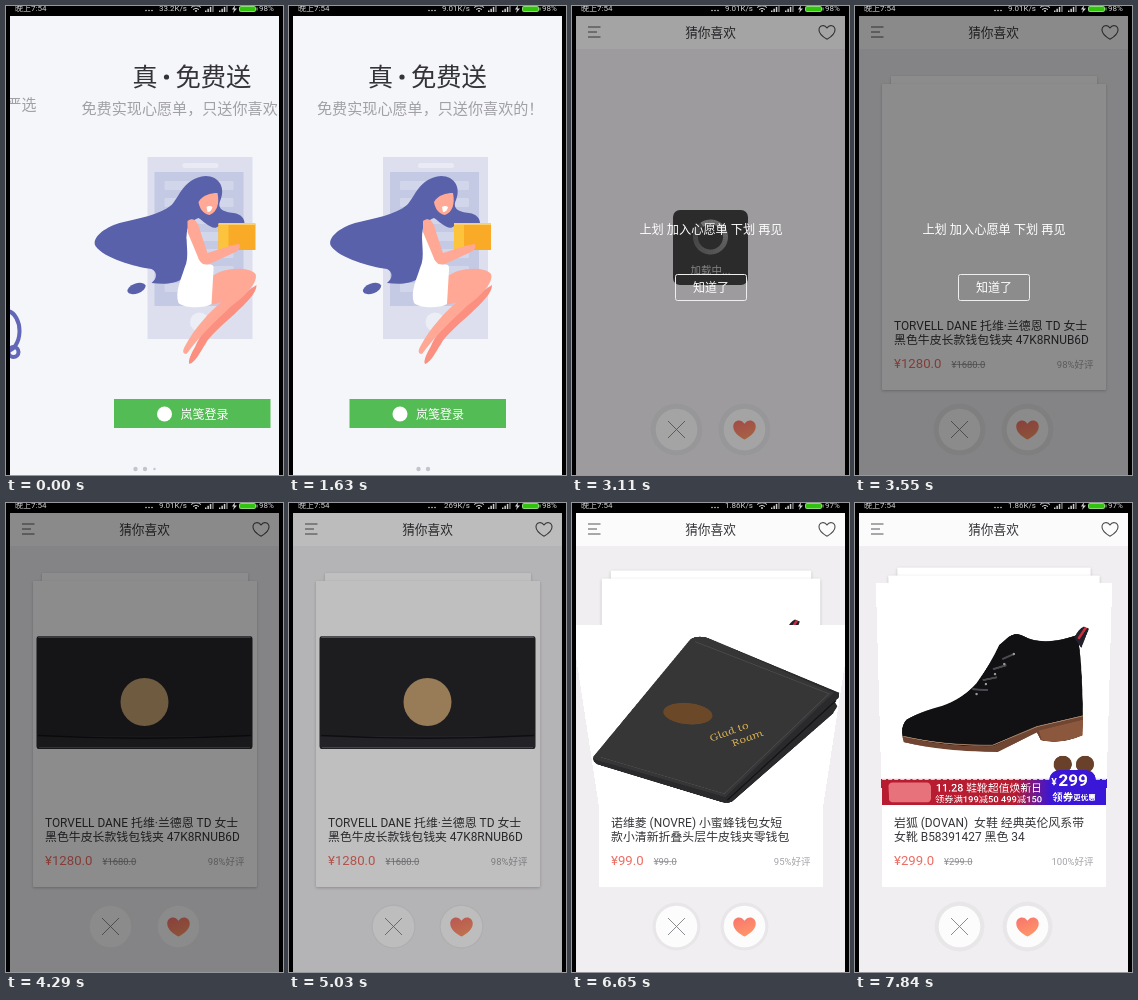
Animation, 277 px wide and 469 px high, one loop 7.99 s. Source, as an HTML page with a canvas:

```html
<!DOCTYPE html>
<html lang="zh-CN">
<head>
<meta charset="utf-8">
<style>
html, body { margin: 0; width: 100%; height: 100%; overflow: hidden; background: #000; }
canvas { display: block; width: 277px; height: 469px; }
</style>
</head>
<body>
<canvas id="stage"></canvas>
<script>
const W = 277, H = 469, LOOP = 7990, STEPS = 54;
const FONT = 'Roboto, "Noto Sans CJK SC", "Noto Sans CJK", sans-serif';
const HINGE = 303, TOP = 78, MID = 139, HALF = 112;
const canvas = document.getElementById('stage');
const dpr = Math.max(1, window.devicePixelRatio || 1);
canvas.width = W * dpr;
canvas.height = H * dpr;
const screen2d = canvas.getContext('2d');
const flap = document.createElement('canvas');
flap.width = HALF * 4;
flap.height = (HINGE - TOP) * 2;
const flap2d = flap.getContext('2d');
let g = screen2d;

// Linear interpolation through [step, value] keys
function at(k, keys) {
  if (k <= keys[0][0]) return keys[0][1];
  for (let i = 1; i < keys.length; i++) {
    const [k0, v0] = keys[i - 1], [k1, v1] = keys[i];
    if (k <= k1) return v0 + (v1 - v0) * (k - k0) / (k1 - k0);
  }
  return keys[keys.length - 1][1];
}
function rect(x, y, w, h, color, r = 0) {
  g.fillStyle = color;
  g.beginPath();
  g.roundRect(x, y, w, h, r);
  g.fill();
}
function disc(x, y, r, color) {
  g.fillStyle = color;
  g.beginPath();
  g.arc(x, y, r, 0, 7);
  g.fill();
}
function oval(x, y, rx, ry, turn, color) {
  g.fillStyle = color;
  g.beginPath();
  g.ellipse(x, y, rx, ry, turn, 0, 7);
  g.fill();
}
function shape(d, color) {
  g.fillStyle = color;
  g.fill(new Path2D(d));
}
function line(d, color, width = 1) {
  g.strokeStyle = color;
  g.lineWidth = width;
  g.stroke(new Path2D(d));
}
function text(s, x, y, size, color, align = 'left', weight = 400) {
  g.font = `${weight} ${size}px ${FONT}`;
  g.textAlign = align;
  g.fillStyle = color;
  g.fillText(s, x, y);
  return g.measureText(s).width;
}
function gradient(x0, y0, x1, y1, from, to) {
  const fill = g.createLinearGradient(x0, y0, x1, y1);
  fill.addColorStop(0, from);
  fill.addColorStop(1, to);
  return fill;
}
function moved(x, draw) {
  g.save();
  g.translate(x, 0);
  draw();
  g.restore();
}

function statusBar(k) {
  const ink = '#cfcfcf';
  rect(0, 0, W, 10, '#000');
  text('晚上7:54', 9, 5.4, 8, ink);
  for (let i = 0; i < 3; i++) disc(140 + i * 3, 4.5, 0.8, ink);
  const speed = k < 11 ? '33.2K/s' : k < 32 ? '9.01K/s' : k < 43 ? '269K/s' : '1.86K/s';
  text(speed, 181, 5.4, 8, ink, 'right');
  line('M185 1.5 Q190 -2 195 1.5 M187 3.5 Q190 1 193 3.5', ink);
  disc(190, 5, 1, ink);
  for (const x of [199, 213])
    for (let i = 0; i < 4; i++) rect(x + i * 2.4, 4.5 - i * 1.8, 1.5, 1.5 + i * 1.8, i < 3 ? ink : '#777');
  shape('M229 -1 L226 3.5 H228 L227 7 L231 2.5 H228.6Z', ink);
  rect(233, 0, 17, 6, '#8bd878', 2);
  rect(234, 1, 15, 4, '#32c40d', 1);
  rect(250.5, 1.5, 1, 3, '#8bd878');
  text(k < 43 ? '98%' : '97%', 253, 5.4, 8, ink);
}

function phone() {
  rect(94, 151, 105, 182, '#dddfee');
  rect(129, 157, 36, 5, '#e9eaf4', 2.5);
  rect(101, 166, 89, 134, '#c4c9e4');
  for (let i = 0; i < 7; i++) rect(111, 175 + i * 17, 69, 9, '#d2d6ea', 1);
  disc(146, 316, 9.5, '#eceef6');
}
function woman() {
  shape('M152 170C166 170 172 182 167 194C163 203 170 206 180 207C188 208 191 213 191 217L165 220C160 226 150 215 145 212C138 214 134 222 133 232C137 245 139 262 130 272C121 279 108 278 98 277C104 272 104 266 98 263C82 261 50 252 42 240C38 232 50 222 66 217C86 212 106 209 118 199C126 191 130 172 152 170Z', '#5a61ab');
  oval(83, 282.5, 9.5, 5, -0.35, '#5a61ab');
  shape('M145 196C149 189 157 187 164 187C166 197 164 206 156 209C150 208 146 203 145 196Z', '#ffa996');
  shape('M153 201Q156 199 159 201Q158 206 154 206Z', '#fff');
  shape('M203 279C204 294 160 322 152 338C146 347 142 356 136 358C134 355 138 347 142 340C150 322 170 300 203 279Z', '#fb9080');
  shape('M158 271C168 261 196 260 202 268C205 276 192 290 178 300C162 315 146 330 133 348C129 348 129 345 131 341C141 322 156 306 168 296C163 298 159 299 157 298Z', '#ffa896');
  shape('M134 222C139 235 144 250 150 257C156 260 161 256 160 264L158 298C150 303 130 302 125 297C121 286 128 272 131 262C137 250 131 236 134 222Z', '#fff');
  rect(165, 218, 37, 26, '#f9ab28');
  rect(165, 218, 10, 26, '#fcc33c');
  rect(165, 217, 37, 2, '#fbd06a');
  shape('M134 215C141 210 145 217 147 226L154 247L176 240L185 238C188 240 186 244 182 246L156 258C149 260 146 256 144 250L134 226Z', '#ffa896');
}
function welcome(k) {
  rect(4, 10, 269, 459, '#f5f6fa');
  moved(k < 4 ? 47.5 * Math.pow(0.36, k) : 0, () => {
    text('严选', -17, 103.5, 15, '#a0a0a6', 'right');
    g.strokeStyle = '#6367b8';
    g.lineWidth = 4;
    g.beginPath();
    g.ellipse(-47, 325, 13, 20, 0, -1.5, 1.5);
    g.stroke();
    g.beginPath();
    g.arc(-40, 346, 5, 0, 7);
    g.stroke();
    text('真', 79, 79.5, 25, '#333338');
    disc(113, 71, 2.6, '#333338');
    text('免费送', 122, 79.5, 25.3, '#333338');
    text('免费实现心愿单，只送你喜欢的！', 28, 107.7, 15.1, '#a0a0a6');
    phone();
    woman();
    rect(60.5, 393, 156.5, 29, '#54bc54');
    disc(111, 408, 7.5, '#fff');
    text('岚笺登录', 127, 412.5, 12, '#fff');
  });
  disc(129.5, 463, 2.2, '#c4c5cc');
  disc(139, 463, 2.2, '#c4c5cc');
  if (k < 1) disc(148.5, 463, 1.2, '#c4c5cc');
}

function purse() {
  rect(30.5, 133, 216, 113, '#27262b', 3);
  rect(32, 133, 213, 2, '#6a696e', 1);
  rect(31, 233, 215, 13, '#2e2d33', 2);
  line('M32 232.5Q138 238 245 232.5', '#131216', 1.5);
  line('M33 244.5H244', '#5a595f', 1);
  disc(138.5, 199, 24, '#c9a574');
}
function wallet() {
  shape('M122 93Q127 88 136 91L250 151V157L247 161L250 167L247 176L160 296Q156 299 150 297L32 242Q27 238 29 231Z', '#2a2a2c');
  shape('M122 93Q127 88 136 91L245 151L153 289L32 236Q28 234 29 231Z', '#363637');
  line('M126 95L241 152L152 284L36 232', '#4b4b4d', 0.8);
  line('M248 160L155 294', '#141415', 1.5);
  oval(118.5, 176, 22, 13, 0.15, '#6a4828');
  g.save();
  g.translate(157, 202);
  g.rotate(-0.48);
  g.font = 'italic 11.5px "Noto Serif", serif';
  g.fillStyle = '#c9a550';
  g.textAlign = 'center';
  g.fillText('Glad to', 0, 0);
  g.fillText('Roam', 11, 15);
  g.restore();
}
function boot() {
  shape('M153 130Q160 125 167 129Q186 140 219 128Q224 150 226 211L181 226L140 244Q85 246 50 234Q46 222 53 213Q66 205 88 199Q108 192 122 176Q136 156 144 138Z', '#111113');
  shape('M216 131Q220 122 225 120L230 122L223 141Z', '#20212b');
  line('M220 132L227 121', '#c8303c', 2.5);
  shape('M49 230Q90 241 138 240L181 220L226 209L226 229Q204 239 185 234L181 226L143 246Q90 246 50 236Z', '#704532');
  shape('M183 224L226 213L226 229Q205 238 186 234Z', '#8b573d');
  line('M50 230Q92 240 138 239L181 220L226 209', '#a58066', 1);
  line('M147 152L158 147M138 162L151 158M128 173L142 170M118 182L133 183', '#4a4a50', 2);
  for (let i = 0; i < 5; i++) disc(158 - i * 9, 147 + i * 10, 1.2, '#999');
}
function banner() {
  rect(27, 274, 224, 28, gradient(160, 0, 196, 0, '#b71c31', '#3a16d8'));
  disc(207, 259, 9, '#694029');
  disc(229, 259, 9, '#694029');
  rect(194, 265, 46, 24, '#3a16d8', 10);
  g.setLineDash([4, 2]);
  line('M28 275H194M240 275H250', '#fff', 0.8);
  g.setLineDash([]);
  rect(34, 278, 42, 21, '#e8727c', 4);
  text('11.28 鞋靴超值焕新日', 81, 287.5, 10.8, '#fff', 'left', 500);
  text('领券满199减50 499减150', 80, 299, 9.3, '#fff', 'left', 500);
  text('¥', 196, 281, 10, '#fff', 'left', 700);
  text('299', 203, 281.5, 17, '#fff', 'left', 700);
  text('领券', 197, 297, 10.5, '#fff', 'left', 700);
  text('更优惠', 218, 296.5, 7.5, '#fff', 'left', 700);
}

const cards = [
  { pic: purse, lines: ['TORVELL DANE 托维·兰德恩 TD 女士', '黑色牛皮长款钱包钱夹 47K8RNUB6D'], price: '¥1280.0', old: '¥1680.0', rate: '98%好评' },
  { pic: wallet, lines: ['诺维菱 (NOVRE) 小蜜蜂钱包女短', '款小清新折叠头层牛皮钱夹零钱包'], price: '¥99.0', old: '¥99.0', rate: '95%好评' },
  { pic() { boot(); banner(); }, lines: ['岩狐 (DOVAN)  女鞋 经典英伦风系带', '女靴 B58391427 黑色 34'], price: '¥299.0', old: '¥299.0', rate: '100%好评' }
];

function details(c) {
  c.lines.forEach((s, i) => text(s, 39, 324 + i * 14, 11.9, '#37373b'));
  const x = 49 + text(c.price, 39, 362, 13.2, '#ee6c62');
  const w = text(c.old, x, 362, 9.4, '#8d8d92');
  rect(x, 358.3, w, 0.8, '#8d8d92');
  text(c.rate, 238.5, 362, 9.5, '#a3a3a8', 'right');
}
function paper(y, h) {
  g.save();
  g.shadowColor = 'rgba(0,0,0,.22)';
  g.shadowBlur = 3 * dpr;
  g.shadowOffsetY = dpr;
  rect(27, y, 224, h, '#fff', 1);
  g.restore();
}
function flatCard(c, loaded = true) {
  paper(TOP, 306);
  if (!c) return;
  if (loaded) c.pic();
  details(c);
}
// The picture half swings towards the viewer around the hinge
function foldedCard(c, a) {
  g.save();
  g.globalAlpha = Math.max(0, Math.min(1, 1 - (a - 1.25) / 0.35));
  rect(27, HINGE - 1, 224, 82, '#fff', 1);
  details(c);
  g.restore();
  const top = TOP + 330 * (1 - Math.cos(a)), tall = HINGE - top;
  if (tall < 2) return;
  const grow = Math.sin(a) / 2;
  g = flap2d;
  g.setTransform(2, 0, 0, 2, -27 * 2, -TOP * 2);
  rect(27, TOP, 224, HINGE - TOP, '#fff');
  c.pic();
  g = screen2d;
  const source = y => {
    const u = (HINGE - y) / tall;
    return flap.height * (1 - u * (1 + grow) / (1 + u * grow));
  };
  for (let y = top; y < HINGE; y++) {
    const end = Math.min(HINGE, y + 1), s0 = Math.max(0, source(y));
    const half = HALF * (1 + grow * (HINGE - y) / tall);
    g.drawImage(flap, 0, s0, flap.width, Math.max(0.5, source(end) - s0), MID - half, y, half * 2, end - y + 0.3);
  }
}
function deck(k) {
  if (k < 23) return;
  const front = k < 42 ? 0 : k < 48 ? 1 : 2;
  const a = [
    at(k, [[37, 0], [38, 0.11], [39, 0.3], [40, 0.6], [41, 1.3]]),
    at(k, [[42, 0], [43, 0.1], [44, 0.26], [45, 0.52], [46, 0.95], [47, 1.45]]),
    at(k, [[51, 0], [52, 0.05], [53, 0.11]])
  ][front];
  const lift = Math.min(1, Math.pow(a, 0.55));
  for (let i = lift > 0 ? 2 : 1; i > 0; i--) {
    const depth = i - lift, size = (224 - 18 * depth) / 224;
    g.save();
    g.translate(27 + 9 * depth, TOP - 8 * depth);
    g.scale(size, size);
    g.translate(-27, -TOP);
    flatCard(i === 1 ? cards[front + 1] : null);
    g.restore();
  }
  if (a > 0) foldedCard(cards[front], a);
  else flatCard(cards[front], k >= 27);
}

function heart(x, y, w) {
  const p = new Path2D(), s = w / 2;
  p.moveTo(x, y + s * 0.85);
  for (const side of [-s, s]) {
    p.moveTo(x, y + s * 0.85);
    p.bezierCurveTo(x + side * 0.35, y + s * 0.65, x + side, y + s * 0.25, x + side, y - s * 0.3);
    p.bezierCurveTo(x + side, y - s * 0.9, x + side * 0.3, y - s * 1.05, x, y - s * 0.55);
  }
  return p;
}
function buttons(k) {
  const halo = at(k, [[24, 26], [27, 20], [29, 20], [34, 22], [45, 24], [53, 25]]);
  for (const x of [104.5, 172.5]) {
    disc(x, 423.5, halo, 'rgba(0,0,0,.035)');
    disc(x, 423.5, 20.8, '#fcfcfc');
  }
  line('M96 415L113 432M113 415L96 432', '#808085', 0.9);
  g.fillStyle = gradient(168, 412, 176, 434, '#f8746e', '#ff9868');
  g.fill(heart(172.5, 424, 22.5));
}
function loading(k) {
  g.save();
  g.globalAlpha = at(k, [[14, 0], [15, 0.5], [17, 1]]);
  rect(101, 204, 75, 75, 'rgba(0,0,0,.72)', 7);
  g.lineWidth = 5;
  for (let i = 0; i < 40; i++) {
    const from = i * Math.PI / 20 - 2.6 + k * 0.02;
    g.strokeStyle = `rgba(255,255,255,${0.15 + 0.45 * (1 - i / 40)})`;
    g.beginPath();
    g.arc(138.5, 231, 15, from, from + Math.PI / 20);
    g.stroke();
  }
  text('加载中...', 138.5, 267.5, 10.5, '#c9c9c9', 'center');
  g.restore();
}
function home(k) {
  rect(4, 10, 269, 459, '#f0eef1');
  deck(k);
  rect(4, 10, 269, 33, '#fbfbfc');
  line('M16 21H28.5M16 26H25M16 31H28.5', '#55555a');
  text('猜你喜欢', 138.5, 31.2, 12.7, '#37373b', 'center');
  g.strokeStyle = '#4c4c50';
  g.lineWidth = 1.1;
  g.stroke(heart(255, 26.5, 16));
  buttons(k);
  if (k >= 15 && k < 23) loading(k);
}
function guide(k) {
  if (k < 21) return;
  const dim = at(k, [[21, 0.35], [24, 0.45], [29, 0.45], [34, 0.25], [39, 0]]);
  rect(4, 10, 269, 459, `rgba(0,0,0,${dim})`);
  if (k > 26) return;
  text('上划 加入心愿单 下划 再见', 139, 227.5, 12.2, '#fff', 'center');
  g.strokeStyle = '#eee';
  g.lineWidth = 1;
  g.beginPath();
  g.roundRect(103.5, 268.5, 71, 26, 2);
  g.stroke();
  text('知道了', 139, 286.3, 12, '#fff', 'center');
}

function draw(k) {
  g.setTransform(dpr, 0, 0, dpr, 0, 0);
  rect(0, 0, W, H, '#000');
  g.save();
  g.beginPath();
  g.rect(4, 10, 269, 459);
  g.clip();
  const enter = at(k, [[11, 0], [12, 0.35], [13, 0.75], [14, 0.95], [15, 1]]);
  if (enter < 1) moved(-269 * enter, () => welcome(k));
  if (enter > 0) moved(269 * (1 - enter), () => home(k));
  guide(k);
  g.restore();
  statusBar(k);
}

let shown = -1;
function tick(now) {
  const k = Math.floor((now % LOOP) / LOOP * STEPS + 0.12) % STEPS;
  if (k !== shown) draw(shown = k);
  requestAnimationFrame(tick);
}
draw(0);
requestAnimationFrame(tick);
</script>
</body>
</html>
```
